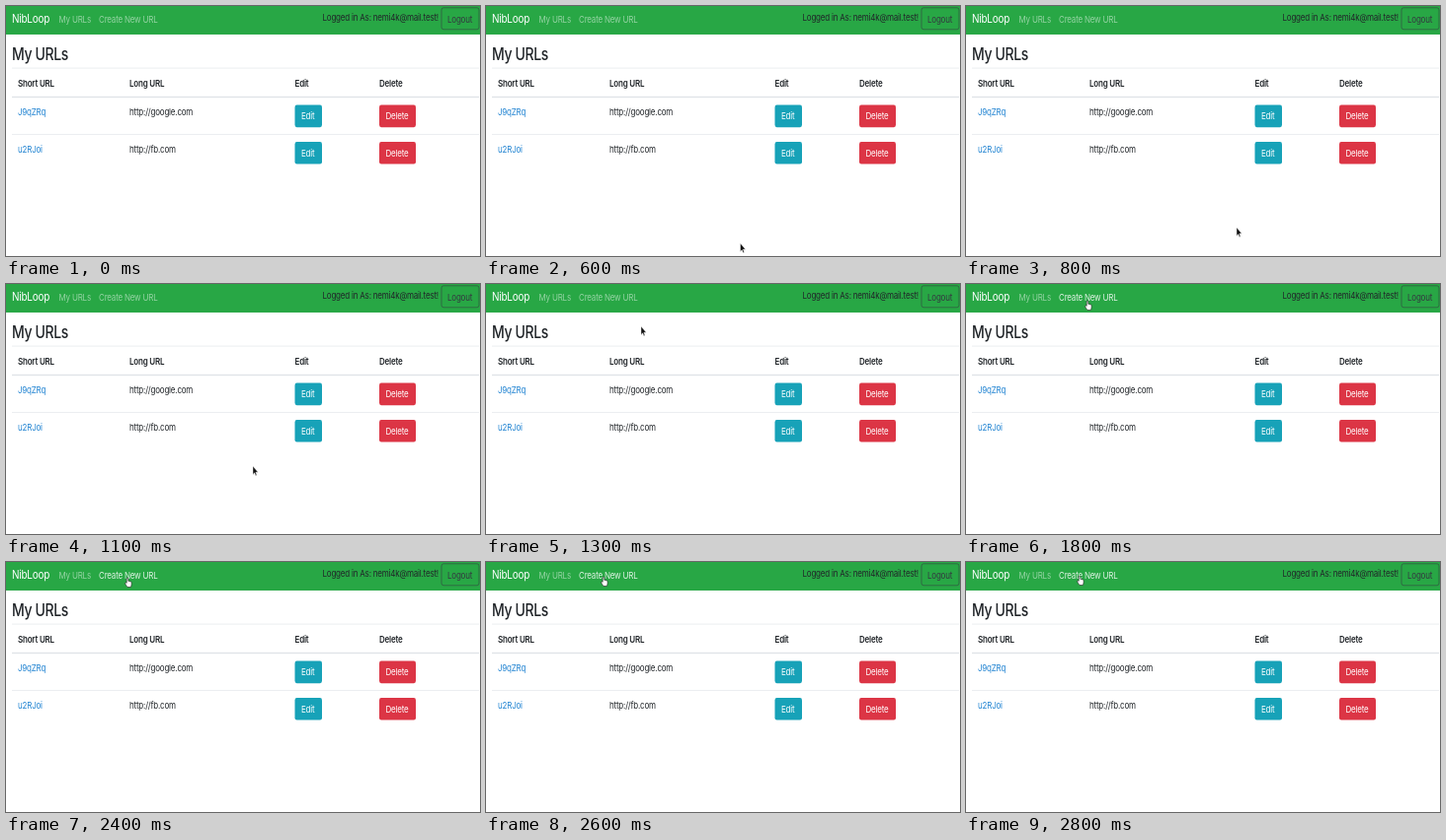
Recreate the animation shown at these times as an HTML page. Size 480 by 254 pixels, loop 3.1 s.

```html
<!DOCTYPE html>
<html lang="en">
<head>
<meta charset="utf-8">
<title>My URLs</title>
<style>
  html, body { margin: 0; width: 100%; height: 100%; overflow: hidden; background: #fff; }
  svg { display: block; width: 100%; height: 100%; }
  text { font: 16px Inter, Roboto, sans-serif; letter-spacing: -.025em; fill: #212529; }
  .brand { font-size: 20px; fill: #fff; }
  .nav { fill: #fff; fill-opacity: .5; }
  .nav.hover { fill-opacity: .85; }
  .title { font-size: 28px; font-weight: 500; }
  .head text { font-weight: 600; }
  .link { fill: #2284d2; }
  .label { fill: #fff; }
  .rule { fill: #dee2e6; }
</style>
</head>
<body>
<!-- The page is laid out at 960 x 427 and squeezed onto the stage as a whole. -->
<svg viewBox="0 0 960 427" preserveAspectRatio="none">
  <defs>
    <g id="buttons">
      <rect x="585" y="169" width="55" height="38" rx="4" fill="#17a2b8"/>
      <text class="label" x="598" y="194">Edit</text>
      <rect x="756" y="169" width="74" height="38" rx="4" fill="#dc3545"/>
      <text class="label" x="769" y="194">Delete</text>
    </g>
  </defs>

  <rect width="960" height="48.7" fill="#28a745"/>
  <text class="brand" x="12" y="29">NibLoop</text>
  <text class="nav" x="107" y="28">My URLs</text>
  <text class="nav" id="create" x="188" y="28">Create New URL</text>
  <text x="641" y="26">Logged in As: nemi4k@mail.test!</text>
  <rect x="882" y="3" width="76" height="37" rx="4" fill="none" stroke="#343a40"/>
  <text x="894" y="28" style="fill:#343a40">Logout</text>

  <text class="title" x="12" y="92.5">My URLs</text>
  <g class="rule">
    <rect x="12" y="105.5" width="946" height="1"/>
    <rect x="12" y="154.5" width="946" height="2"/>
    <rect x="12" y="218.5" width="946" height="1"/>
  </g>
  <g class="head">
    <text x="24" y="137.5">Short URL</text>
    <text x="250" y="137.5">Long URL</text>
    <text x="585" y="137.5">Edit</text>
    <text x="756" y="137.5">Delete</text>
  </g>
  <g>
    <text class="link" x="24" y="187">J9qZRq</text>
    <text x="250" y="187">http://google.com</text>
    <use href="#buttons"/>
  </g>
  <g transform="translate(0 63)">
    <text class="link" x="24" y="187">u2RJoi</text>
    <text x="250" y="187">http://fb.com</text>
    <use href="#buttons"/>
  </g>

  <g id="cursor" visibility="hidden">
    <path id="arrow" d="M0 0V14.5L3.4 11.4 5.6 16.4 8 15.4 5.8 10.5H10.5Z" fill="#111" stroke="#fff" stroke-width=".8"/>
    <path id="hand" d="M-1.6 9V1.5a1.6 1.6 0 0 1 3.2 0V5.5q5.6 .3 6.6 2V11q-.3 2.6-1.4 5H0q-3-3-5-6.8 1-1.6 3.4-.2Z" fill="#fff" stroke="#222" stroke-width="1.1"/>
  </g>
</svg>
<script>
  const LOOP = 3100, HOVER_FROM = 1500;
  const SCALE_X = 960 / 480, SCALE_Y = 427 / 254;
  // Pointer tip: [time in ms, x, y] in stage pixels; it jumps from step to step.
  const steps = [
    [600, 257.5, 241], [700, 268, 231], [800, 274, 225],
    [1100, 250, 185], [1200, 200, 95], [1300, 157, 43],
    [1400, 140, 31], [1500, 131, 24], [1600, 126, 21.3],
    [1700, 124, 18], [1800, 123, 17],
    [2400, 123, 16], [2500, 121.5, 15.5], [2600, 119, 15],
    [2700, 117, 14.5], [2800, 115, 14]
  ];
  const byId = id => document.getElementById(id);
  const show = (el, on) => el.setAttribute('visibility', on ? 'visible' : 'hidden');
  const cursor = byId('cursor'), arrow = byId('arrow'), hand = byId('hand'), create = byId('create');

  function draw() {
    const time = performance.now() % LOOP;
    const step = steps.filter(s => s[0] <= time).pop();
    const hover = time >= HOVER_FROM;
    show(arrow, step && !hover);
    show(hand, step && hover);
    create.classList.toggle('hover', hover);
    if (step) cursor.setAttribute('transform', `translate(${step[1] * SCALE_X} ${step[2] * SCALE_Y})`);
    requestAnimationFrame(draw);
  }
  draw();
</script>
</body>
</html>
```
